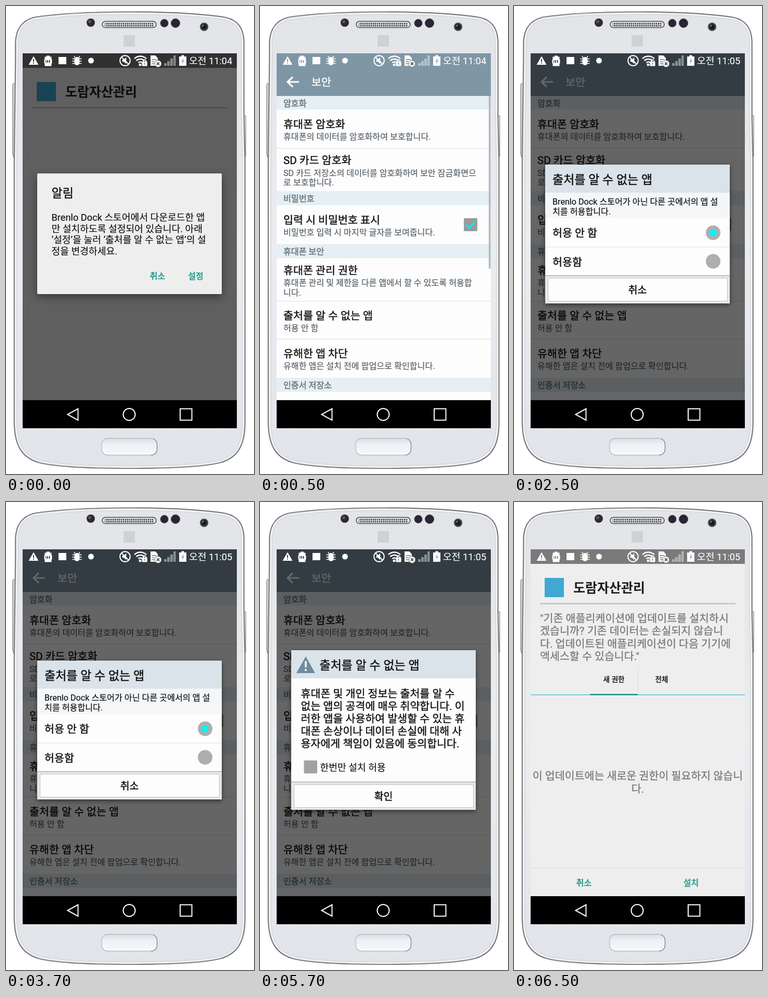
An HTML page for the animation above (8000 ms loop, 477 by 900 pixels).

```html
<!DOCTYPE html>
<html lang="ko">
<head>
<meta charset="utf-8">
<title>앱 설치 설정 안내</title>
<style>
html, body { margin: 0; width: 100%; height: 100%; overflow: hidden; background: #fff; }
svg { display: block; width: 100%; height: 100%; }
text {
  font-family: Roboto, "Noto Sans CJK KR", "Noto Sans KR", "Noto Sans CJK", sans-serif;
  fill: currentColor; color: #111;
}
.mid { text-anchor: middle; }
.t25 { font-size: 25px; font-weight: 700; color: #1c1c1c; }
.t23 { font-size: 23px; stroke: currentColor; stroke-width: .45px; }
.t20 { font-size: 20.6px; stroke: currentColor; stroke-width: .4px; }
.t18 { font-size: 18.2px; stroke: currentColor; stroke-width: .15px; }
.t16 { font-size: 16.15px; stroke: currentColor; stroke-width: .2px; }
.btn { font-size: 19.4px; text-anchor: middle; stroke: currentColor; stroke-width: .5px; }
.act { font-size: 16px; color: #129585; text-anchor: middle; stroke: currentColor; stroke-width: .5px; }
.tab { font-size: 13.7px; font-weight: 700; color: #222; text-anchor: middle; }
.sub { color: #566068; }
.head { color: #6e7a82; stroke-width: .6px; }
.soft { color: #757575; stroke-width: .25px; }
.white { color: #fff; }
.card { filter: drop-shadow(0 3px 4px rgba(0, 0, 0, .5)); }
.notice .card { filter: drop-shadow(0 5px 8px rgba(0, 0, 0, .45)); }

.state { visibility: hidden; animation: 8s step-end infinite; }
.install { animation-name: install; }
.secure { animation-name: secure; }
.scroll { animation-name: scroll; }
.dim { animation-name: dim; }
.notice { animation-name: notice; }
.choice { animation-name: choice; }
.warn { animation-name: warn; }
.update { animation-name: update; }
.early { animation-name: early; }
.late { animation-name: late; }
@keyframes install { 0%, 81.25% { visibility: visible } 6.25% { visibility: hidden } }
@keyframes secure { 0%, 81.25% { visibility: hidden } 6.25% { visibility: visible } }
@keyframes scroll { 0%, 31.25% { visibility: hidden } 6.25% { visibility: visible } }
@keyframes dim { 0%, 31.25% { visibility: visible } 6.25%, 81.25% { visibility: hidden } }
@keyframes notice { 0% { visibility: visible } 6.25% { visibility: hidden } }
@keyframes choice { 0%, 56.25% { visibility: hidden } 31.25% { visibility: visible } }
@keyframes warn { 0%, 81.25% { visibility: hidden } 56.25% { visibility: visible } }
@keyframes update { 0% { visibility: hidden } 81.25% { visibility: visible } }
@keyframes early { 0% { visibility: visible } 31.25% { visibility: hidden } }
@keyframes late { 0% { visibility: hidden } 31.25% { visibility: visible } }
</style>
</head>
<body>
<svg viewBox="0 0 477 900" preserveAspectRatio="none">
<defs>
  <linearGradient id="shell" x2="0" y2="1">
    <stop offset="0" stop-color="#e3e5e9"/><stop offset=".5" stop-color="#eceef2"/><stop offset="1" stop-color="#e2e5ea"/>
  </linearGradient>
  <linearGradient id="key" x2="0" y2="1">
    <stop offset="0" stop-color="#dcdfe4"/><stop offset=".4" stop-color="#eff1f4"/><stop offset="1" stop-color="#f6f7f9"/>
  </linearGradient>
  <pattern id="weave" width="4" height="4" patternUnits="userSpaceOnUse">
    <path d="M0 0h1v1H0zM2 2h1v1H2z" fill="#d3d6dc" opacity=".6"/>
  </pattern>
  <pattern id="mesh" width="4" height="4" patternUnits="userSpaceOnUse">
    <circle cx="2" cy="2" r="1.4" fill="#3c3c3e"/>
  </pattern>
  <path id="body" d="M18 100V70C19 44 30 28 54 21.500C105 13.500 180 11 238 11S372 13.500 422 21.500C446 27 457 42 458 68V210L460 300V800C460 845 446 868 414 878C376 888 300 889.500 238 889.500S100 888 62 878C30 868 16 845 15.500 800V300Z"/>
  <clipPath id="inside"><use href="#body"/></clipPath>
</defs>

<!-- Phone -->
<path d="M17 148h-2.500q-1.500 2-1.500 6v130q0 5 2 7h2z" fill="#dcdee1"/>
<path d="M14.500 148q-1.500 2-1.500 6v130q0 5 2 7M459 211h2v78h-1" fill="none" stroke="#5a5a5c"/>
<use href="#body" fill="url(#shell)"/>
<use href="#body" fill="url(#weave)"/>
<g clip-path="url(#inside)" fill="none">
  <use href="#body" stroke="#d3d6da" stroke-width="12"/>
  <use href="#body" stroke="#f4f5f7" stroke-width="9"/>
  <use href="#body" stroke="#bfc2c6" stroke-width="4"/>
</g>
<use href="#body" fill="none" stroke="#4c4c4f" stroke-width="1.2"/>
<circle cx="163" cy="32" r="8" fill="#2c2b31"/><circle cx="161" cy="30" r="3" fill="#56555c"/>
<rect x="185" y="29.500" width="104" height="12" rx="6" fill="#dcdee0" stroke="#4c4c4e" stroke-width="1.5"/>
<rect x="190" y="32" width="94" height="8" rx="3" fill="url(#mesh)"/>
<g fill="#2b2433" stroke="#45404b">
  <circle cx="304.500" cy="33" r="7.500"/><circle cx="326" cy="33" r="8.500"/>
</g>
<circle cx="381" cy="40" r="8" fill="#34363b" stroke="#8b8e93"/>
<circle cx="381" cy="40" r="4" fill="#15161d"/><circle cx="379" cy="38" r="1.5" fill="#8c96a8"/>
<rect x="226" y="56" width="22" height="22" fill="#cfd1d5"/>
<rect x="184" y="831.500" width="106.500" height="32" rx="11" fill="url(#key)" stroke="#b9bcc1" stroke-width="1.3"/>
<path d="M187 852q1 9 10 9h80q10 0 11-9" fill="none" stroke="#fff" stroke-width="2"/>
<path d="M283 832.500q6.500 2 7.500 9v12q-1 9-11 10.500" fill="none" stroke="#85888d" stroke-width="1.3"/>

<!-- Installer -->
<g class="state install">
  <rect x="32" y="91" width="412" height="667" fill="#eee"/>
  <rect x="32" y="91" width="412" height="28" fill="#7a7a7a"/>
  <rect x="59" y="146" width="37" height="37" fill="#3fa9d3"/>
  <text class="t25" x="114" y="173.500">도람자산관리</text>
  <rect x="50" y="194" width="376" height="3" fill="#c9c9c9"/>
</g>
<g class="state update">
  <text class="t20 soft" x="50" y="231">"기존 애플리케이션에 업데이트를 설치하시</text>
  <text class="t20 soft" x="50" y="255">겠습니까? 기존 데이터는 손실되지 않습니</text>
  <text class="t20 soft" x="50" y="279.500">다. 업데이트된 애플리케이션이 다음 기기에</text>
  <text class="t20 soft" x="50" y="303.500">액세스할 수 있습니다."</text>
  <text class="tab" x="192" y="345.500">새 권한</text>
  <text class="tab" x="284" y="345.500">전체</text>
  <path d="M238.500 318v44" stroke="#dadada"/>
  <rect x="32" y="370" width="412" height="1.500" fill="#5dbde0"/>
  <rect x="146" y="369" width="92" height="2.500" fill="#1b9a83"/>
  <text class="t20 soft mid" x="238" y="534">이 업데이트에는 새로운 권한이 필요하지 않습니</text>
  <text class="t20 soft mid" x="238" y="558.500">다.</text>
  <path d="M32 703.500H444" stroke="#dadada"/>
  <text class="act" x="134.500" y="738">취소</text>
  <text class="act" x="340.500" y="738">설치</text>
</g>

<!-- Security settings -->
<g class="state secure">
  <rect x="32" y="91" width="412" height="667" fill="#fdfdfd"/>
  <rect x="32" y="91" width="412" height="82" fill="#7f97a5"/>
  <path d="M75 146H53M63 136.500L53 146l10 9.500" fill="none" stroke="#fff" stroke-width="3.200"/>
  <text class="t20 white" x="99" y="154">보안</text>
  <path d="M32 173H444v26H32zM32 356H444v27H32zM32 458H444v27H32zM32 715H444v27H32z" fill="#e6eff3"/>
  <path d="M32 273.500H444M32 567.500H444M32 640.500H444" stroke="#dcdfe1"/>
  <text class="t16 head" x="45" y="192.500">암호화</text>
  <text class="t16 head" x="45" y="376">비밀번호</text>
  <text class="t16 head" x="45" y="477.500">휴대폰 보안</text>
  <text class="t16 head" x="45" y="734.500">인증서 저장소</text>

  <text class="t20" x="45" y="235">휴대폰 암호화</text>
  <text class="t16 sub" x="45" y="257">휴대폰의 데이터를 암호화하여 보호합니다.</text>
  <text class="t20" x="45" y="303.500">SD 카드 암호화</text>
  <text class="t16 sub" x="45" y="326.500">SD 카드 저장소의 데이터를 암호화하여 보안 잠금화면으</text>
  <text class="t16 sub" x="45" y="345">로 보호합니다.</text>
  <text class="t20" x="45" y="419">입력 시 비밀번호 표시</text>
  <text class="t16 sub" x="45" y="441">비밀번호 입력 시 마지막 글자를 보여줍니다.</text>
  <rect x="392" y="408" width="26" height="25" rx="1.5" fill="#9b9b9b"/>
  <path d="M396.500 420.500l6 6 11.500-11.500" fill="none" stroke="#0ee6f2" stroke-width="3.400"/>
  <text class="t20" x="45" y="516">휴대폰 관리 권한</text>
  <text class="t16 sub" x="45" y="538">휴대폰 관리 및 제한을 다른 앱에서 할 수 있도록 허용합</text>
  <text class="t16 sub" x="45" y="556.500">니다.</text>
  <text class="t20" x="45" y="603">출처를 알 수 없는 앱</text>
  <text class="t16 sub" x="45" y="625">허용 안 함</text>
  <text class="t20" x="45" y="676">유해한 앱 차단</text>
  <text class="t16 sub" x="45" y="698">유해한 앱은 설치 전에 팝업으로 확인합니다.</text>
</g>
<rect class="state scroll" x="440" y="173" width="3.500" height="332" fill="#b3b8ba"/>
<rect class="state dim" x="32" y="91" width="412" height="667" opacity=".6"/>

<!-- Blocked install notice -->
<g class="state notice">
  <rect class="card" x="60" y="322" width="355" height="232" rx="2" fill="#eee"/>
  <text class="t23" x="87.500" y="367.500">알림</text>
  <text class="t18" x="87.500" y="413">Brenlo Dock 스토어에서 다운로드한 앱</text>
  <text class="t18" x="87.500" y="434.500">만 설치하도록 설정되어 있습니다. 아래</text>
  <text class="t18" x="87.500" y="456">‘설정’을 눌러 ‘출처를 알 수 없는 앱’의 설</text>
  <text class="t18" x="87.500" y="477.500">정을 변경하세요.</text>
  <text class="act" x="291.500" y="525">취소</text>
  <text class="act" x="365" y="525">설정</text>
</g>

<!-- Allow or deny -->
<g class="state choice">
  <rect class="card" x="60" y="305" width="355" height="267" fill="#fdfdfd"/>
  <rect x="60" y="305" width="355" height="54" fill="#dae3ea"/>
  <rect x="60" y="359" width="355" height="49" fill="#f5f6f7"/>
  <text class="t23" x="74" y="341.500">출처를 알 수 없는 앱</text>
  <text class="t16" x="74" y="382">Brenlo Dock 스토어가 아닌 다른 곳에서의 앱 설</text>
  <text class="t16" x="74" y="400.500">치를 허용합니다.</text>
  <text class="t20" x="74" y="444">허용 안 함</text>
  <text class="t20" x="74" y="499.500">허용함</text>
  <path d="M60 463.500h355" stroke="#dcdfe1"/>
  <g fill="#aeaeae"><circle cx="383" cy="436" r="14"/><circle cx="383" cy="491" r="14"/></g>
  <circle cx="383" cy="436" r="7" fill="#0ef0f4"/>
  <rect x="60" y="518" width="355" height="54" fill="#e6e9ec"/>
  <path d="M60 518.500h355" stroke="#a9adb3" stroke-width="1.5"/>
  <rect x="65.500" y="523.500" width="345" height="44" rx="1.5" fill="#fdfdfd" stroke="#bcc0c6"/>
  <text class="btn" x="237.500" y="553">취소</text>
</g>

<!-- Risk warning -->
<g class="state warn">
  <rect class="card" x="60" y="285" width="355" height="307" fill="#fdfdfd"/>
  <rect x="60" y="285" width="355" height="54" fill="#dae3ea"/>
  <path d="M88 297l18 32H70z" fill="#6f8b9e"/>
  <path d="M88 306v12M88 321v4" stroke="#fff" stroke-width="3.500"/>
  <text class="t23" x="114.500" y="321.500">출처를 알 수 없는 앱</text>
  <text class="t20" x="78.500" y="376">휴대폰 및 개인 정보는 출처를 알 수</text>
  <text class="t20" x="78.500" y="399.500">없는 앱의 공격에 매우 취약합니다. 이</text>
  <text class="t20" x="78.500" y="423.500">러한 앱을 사용하여 발생할 수 있는 휴</text>
  <text class="t20" x="78.500" y="447.500">대폰 손상이나 데이터 손실에 대해 사</text>
  <text class="t20" x="78.500" y="471.500">용자에게 책임이 있음에 동의합니다.</text>
  <rect x="84.500" y="497" width="25.500" height="25" rx="2" fill="#a2a2a2"/>
  <text class="t18" x="115.500" y="516.500">한번만 설치 허용</text>
  <rect x="60" y="538" width="355" height="54" fill="#e6e9ec"/>
  <path d="M60 538.500h355" stroke="#a9adb3" stroke-width="1.5"/>
  <rect x="65.500" y="543.500" width="345" height="44" rx="1.5" fill="#fdfdfd" stroke="#bcc0c6"/>
  <text class="btn" x="237.500" y="572.500">확인</text>
</g>

<!-- Status bar -->
<g fill="#fff">
  <path fill-rule="evenodd" d="M53 96.500l9.500 16.500h-19zM52 102h2v5h-2zM52 108.500h2v2h-2z"/>
  <path fill-rule="evenodd" d="M78 95.500h6v2h3.500v5h1v8h-1v5h-13v-5h-1v-8h1v-5H78zM76 104h1v5h-1zM78.500 104h2v5h-2zM82.500 104h2v5h-2z"/>
  <rect x="101" y="98" width="15" height="14"/>
  <rect x="131.500" y="98" width="10" height="16" rx="5"/>
  <path d="M127.500 101.500h18M127.500 106h18M127.500 110.500h18M133 100l-2-4M140 100l2-4" stroke="#fff" stroke-width="1.600"/>
  <circle cx="163.500" cy="105" r="5.500"/>
</g>
<g fill="none" stroke="#fff" stroke-width="2">
  <circle cx="229" cy="105" r="9.800"/>
  <path d="M222 98l14 14"/>
  <path d="M224 103h3l4-4v12l-4-4h-3z" fill="#fff" stroke-width=".5"/>
  <path d="M247 101q11-9 23 0M250.500 105q8-6 16 0M254.500 109q4-3 8 0" stroke-width="2.600"/>
</g>
<g fill="#fff">
  <circle cx="258" cy="113" r="2.500"/>
  <rect x="261.500" y="106.500" width="10" height="9" rx="1"/>
  <path d="M264 107v-2.500q2.500-3 5 0v2.500" fill="none" stroke="#fff" stroke-width="1.5"/>
  <path d="M266.500 109v4" stroke="#777" stroke-width="1.5"/>
  <path d="M278 95h9l5 5v15h-14z"/>
  <path d="M280.500 103h9M280.500 107h5M280.500 111h5" stroke="#777" stroke-width="1.5"/>
  <circle cx="292.500" cy="111" r="6.500" stroke="#666"/>
  <path d="M290 108.500l5 5m0-5l-5 5" stroke="#555" stroke-width="1.8"/>
  <path d="M304 110h5v5h-5zM310 106h5v9h-5zM316 101h5v14h-5zM322 95h4.500v20H322z" opacity=".42"/>
  <path d="M337.500 94.500h5v2.500h4.500v18h-14V97h4.500z"/>
  <path d="M342 99.500l-4.500 7h2.500l-1.500 5.500 4.500-7h-2.500z" fill="#9aa1a5"/>
</g>
<text class="t18 white state early" x="352" y="111.500">오전 11:04</text>
<text class="t18 white state late" x="352" y="111.500">오전 11:05</text>

<!-- Navigation bar -->
<rect x="32" y="758" width="412" height="54"/>
<g fill="none" stroke="#fff" stroke-width="2">
  <path d="M118.500 785.500L138.500 774.500v22z"/>
  <circle cx="237" cy="785.500" r="11.500"/>
  <rect x="335" y="774.500" width="22.500" height="22"/>
</g>
</svg>
</body>
</html>
```
